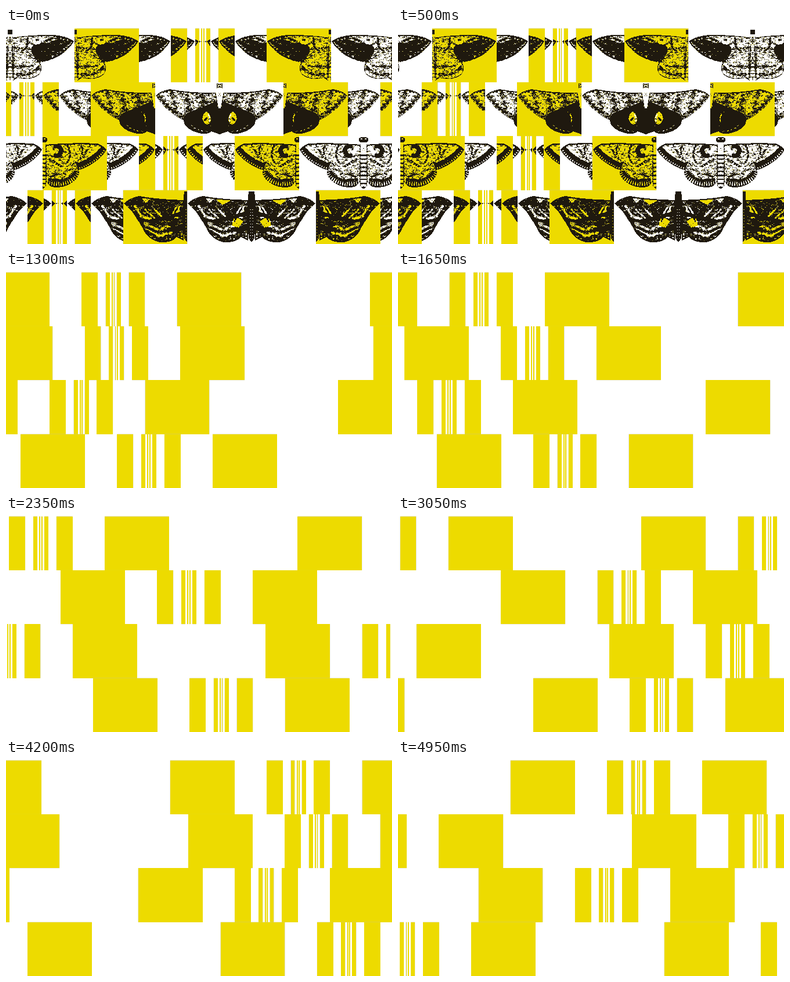
These frames come from a looping animation (665 px wide and 374 px high, 5 s). An HTML page with a canvas:

```html
<!DOCTYPE html>
<html lang="en">
<head>
<meta charset="utf-8">
<title>Moth frieze</title>
<style>
  html, body { margin: 0; width: 100%; height: 100%; overflow: hidden; background: #fff; }
  canvas { display: block; }
</style>
</head>
<body>
<canvas id="stage" width="665" height="374"></canvas>
<script>
const ctx = document.getElementById('stage').getContext('2d');
const STAGE_W = 665, STAGE_H = 374, TOP = 0.6, ROW_H = (STAGE_H - TOP) / 4;
const YELLOW = '#eddb00', EDGE = '#c4c4b0';
const WING = STAGE_W / 6;      // widest tile
const TILES = 8;               // each tile is half as wide as the one before
const PERIOD = 2 * WING * (3 - 2 ** (1 - TILES));
const LOOP = 5000, STEP = 50, SPEED = 5.9375, MOTH_STEPS = 26;

const hash = (x, y) => {
  const s = Math.sin(x * 127.1 + y * 311.7) * 43758.5453;
  return s - Math.floor(s);
};
const mix = (a, b, t) => a + (b - a) * t;
function cloud(x, y) {
  const i = Math.floor(x), j = Math.floor(y), u = x - i, v = y - j;
  return mix(mix(hash(i, j), hash(i + 1, j), u), mix(hash(i, j + 1), hash(i + 1, j + 1), u), v);
}

// Right half of each moth. Shapes: tone, path.
// Marks stay inside the shapes: tone, path, stroke width (0 = fill), dash.
function ochreMoth() {
  const fore = 'M4 17Q30 12 75 12Q98 14 110 23Q102 37 85 48Q68 58 48 60L4 36Z';
  const hind = 'M4 32L48 57Q57 64 53 76Q48 86 30 88L12 87L5 91Z';
  const body = 'M0 3H4V12L7 24L6 84L0 91Z';
  return {
    shapes: [[178, hind], [168, fore], [170, body]],
    marks: [
      [100, 'M51 66Q42 82 10 80', 6], [125, 'M44 62Q32 70 8 66', 3], [70, hind, 2],
      [25, 'M36 36Q42 22 66 26Q90 12 110 23Q102 37 85 48Q68 58 50 58Q38 50 36 36'],
      [70, 'M58 24L78 16L100 20', 4], [110, 'M72 50Q92 40 106 25', 3],
      [60, 'M18 40Q32 38 30 18', 3], [200, 'M38 18Q50 14 58 20Q50 32 40 28Z'],
      [90, 'M44 21h6', 3], [30, 'M4 17Q30 12 75 12Q98 14 110 23', 3],
      [90, 'M7 24L6 84', 2], [90, 'M0 60V90', 4, [2, 4]],
      [0, 'M0 2H6V11H0Z']
    ]
  };
}

function spotMoth() {
  const fore = 'M5 19Q50 20 86 13Q104 16 110 25Q98 43 80 56Q68 65 56 68L8 38Z';
  const hind = 'M6 34L56 55Q65 62 60 74Q52 86 30 90Q20 91 14 86L0 91V34Z';
  const spot = 'M22 52C32 56 32 70 22 74C14 74 12 60 22 52Z';
  return {
    shapes: [[142, fore], [0, hind], [210, 'M0 10Q8 14 7 26L3 46H0Z'], [150, 'M0 3H5V12H0Z']],
    marks: [
      [95, 'M58 20L50 50M84 15L74 52M32 22L24 40', 6], [200, 'M46 24L40 44M72 22L62 56M94 22L84 46', 4],
      [75, 'M107 22Q94 42 66 60', 4], [50, 'M5 19Q50 20 86 13Q104 16 110 25', 4],
      [0, hind], ['y', spot], [190, 'M20 56Q15 62 18 70', 2], [30, 'M22 62L26 68', 3],
      [110, 'M16 86Q36 88 50 74', 1.5],
      [230, 'M0 10Q8 14 7 26L3 46H0Z'], [60, 'M8 14L6 28L3 46', 2], [0, 'M0 2H5V11', 2]
    ]
  };
}

function fringeMoth() {
  const fore = 'M5 15Q50 11 94 13Q104 16 110 24Q102 38 84 49Q72 57 60 59L5 42Z';
  const hind = 'M5 38L60 56Q68 66 54 78Q40 90 22 89Q10 88 6 78Z';
  const rim = 'M62 60Q62 70 48 78Q32 87 8 80';
  const margin = 'M106 22Q92 42 60 54';
  return {
    shapes: [[168, hind], [172, fore], [235, 'M0 12H6V86L0 92Z'], [0, 'M0 2Q9 1 8 8Q6 12 0 11Z']],
    marks: [
      [10, rim, 16], [255, rim, 7, [1.4, 2.6]], [120, 'M12 72L44 60', 3],
      [10, margin, 13], [235, 'M106 25Q94 44 62 57', 3, [1.6, 2.4]],
      [90, 'M42 16Q54 32 40 50M66 16Q74 28 58 48', 3], [105, 'M78 22L70 38M12 40L34 54', 4],
      [0, 'M19 17Q33 16 32 27Q30 37 19 33', 7], [215, 'M8 18L20 30', 6],
      [20, 'M5 15Q50 11 94 13Q104 16 110 24', 4],
      [235, 'M0 12H6V86L0 92Z'], [0, 'M3 32V91', 6, [2.5, 4.5]], [60, 'M6 14V88', 1.5],
      [0, 'M0 2Q9 1 8 8Q6 12 0 11Z'], [200, 'M2 5h3', 2]
    ]
  };
}

function emberMoth() {
  const fore = 'M5 18Q50 17 84 11Q102 15 110 24Q98 33 91 45L84 56L60 58L5 42Z';
  const hind = 'M5 38L60 54L86 52Q80 62 76 70Q68 86 48 91Q28 92 18 82L6 88Z';
  return {
    shapes: [[75, hind], [65, fore], [0, 'M0 3H5L7 28L5 84L0 91Z']],
    marks: [
      [205, 'M26 74L50 80L72 66', 3], [190, 'M30 62L50 70L76 58', 4], [20, 'M22 68L50 74L76 64', 3],
      [10, 'M110 24Q96 12 76 14L84 30Z'], [190, 'M92 27L80 46L62 52', 4], [10, 'M100 30L86 52', 4],
      [205, 'M64 16L78 15L72 24Z'], ['y', 'M34 18L62 16L50 26Z'], [180, 'M60 30L44 48M74 34L56 50', 3],
      ['y', 'M14 54L30 46L34 62L22 66Z'], [240, 'M12 28L20 30L30 46L16 50Z'],
      [10, 'M16 30L30 56', 2.5], [10, 'M36 24L42 54M5 42L60 56', 3],
      [20, 'M5 18Q50 17 84 11Q102 15 110 24', 4], [0, hind, 4],
      [0, 'M0 2H5L7 28L5 84L0 91Z'], [190, 'M2 34V86', 2, [1, 4]]
    ]
  };
}

// Paint tones, then reduce them to grainy ink on a clear ground.
function print({ shapes, marks }, tinted) {
  const c = document.createElement('canvas');
  c.width = 111;
  c.height = 94;
  const g = c.getContext('2d', { willReadFrequently: true });
  const paint = ([tone, d, width = 0, dash = []]) => {
    const color = tone === 'y' ? YELLOW : `rgb(${tone},${tone},${tone})`;
    const path = new Path2D(d);
    g.fillStyle = g.strokeStyle = color;
    g.lineWidth = width;
    g.setLineDash(dash);
    if (width) g.stroke(path); else g.fill(path);
  };
  shapes.forEach(paint);
  g.globalCompositeOperation = 'source-atop';
  g.filter = 'blur(0.7px)';
  marks.forEach(paint);

  const img = g.getImageData(0, 0, c.width, c.height), p = img.data;
  for (let i = 0; i < p.length; i += 4) {
    const x = i / 4 % c.width, y = Math.floor(i / 4 / c.width);
    const grain = 0.4 * hash(x, y) + 0.6 * cloud(x / 3, y / 2);
    const v = p[i] + (grain - 0.5) * 290;
    const accent = p[i] - p[i + 2] > 90;
    if (p[i + 3] < 110) p[i + 3] = 0;
    else if (v < 128 || accent && !tinted) p.set([31, 25, 15, 255], i);
    else if (accent) p.set([237, 219, 0, 255], i);
    else if (v < 142) p.set([176, 168, 84, 255], i);
    else p[i + 3] = 0;
  }
  g.putImageData(img, 0, 0);
  return c;
}

const row = (x, dir, moth) => ({ x, dir, onWhite: print(moth, true), onYellow: print(moth, false) });
const rows = [
  row(7.4, -1, ochreMoth()),
  row(367.6, 1, spotMoth()),
  row(615.6, -1, fringeMoth()),
  row(423.3, 1, emberMoth())
];

// Whole pixels in yellow, the partly covered rim in grey.
function ground(x, y, w) {
  const left = Math.round(x), top = Math.round(y);
  ctx.fillStyle = EDGE;
  ctx.fillRect(x, y, w, ROW_H);
  ctx.fillStyle = YELLOW;
  ctx.fillRect(left, top, Math.round(x + w) - left, Math.round(y + ROW_H) - top);
}

function wing(art, x, y, side, offset, w) {
  const crop = art.width * w / WING;
  ctx.setTransform(side, 0, 0, 1, x, Math.floor(y));
  ctx.drawImage(art, art.width - crop, 0, crop, art.height, offset, 0, w, art.height);
  ctx.setTransform(1, 0, 0, 1, 0, 0);
}

// One moth and its shrinking wing tiles, mirrored on both sides.
function unit(x, y, { onWhite, onYellow }, moths) {
  for (const side of [1, -1]) {
    if (moths) wing(onWhite, x, y, side, 0, WING);
    let offset = WING;
    for (let k = 0; k < TILES; k++) {
      const w = WING / 2 ** k, yellow = k % 2 === 0;
      if (yellow) ground(side > 0 ? x + offset : x - offset - w, y, w);
      if (moths) wing(yellow ? onYellow : onWhite, x, y, side, offset, w);
      offset += w;
    }
  }
}

function draw(t) {
  const step = Math.floor(t % LOOP / STEP);
  ctx.imageSmoothingEnabled = false;
  ctx.fillStyle = '#fff';
  ctx.fillRect(0, 0, STAGE_W, STAGE_H);
  rows.forEach((r, i) => {
    const shift = r.x + r.dir * SPEED * step;
    const first = (shift % PERIOD + PERIOD) % PERIOD;
    for (const n of [-1, 0, 1]) unit(first + n * PERIOD, TOP + i * ROW_H, r, step < MOTH_STEPS);
  });
}

const start = performance.now();
function frame() {
  draw(performance.now() - start);
  requestAnimationFrame(frame);
}
frame();
</script>
</body>
</html>
```
